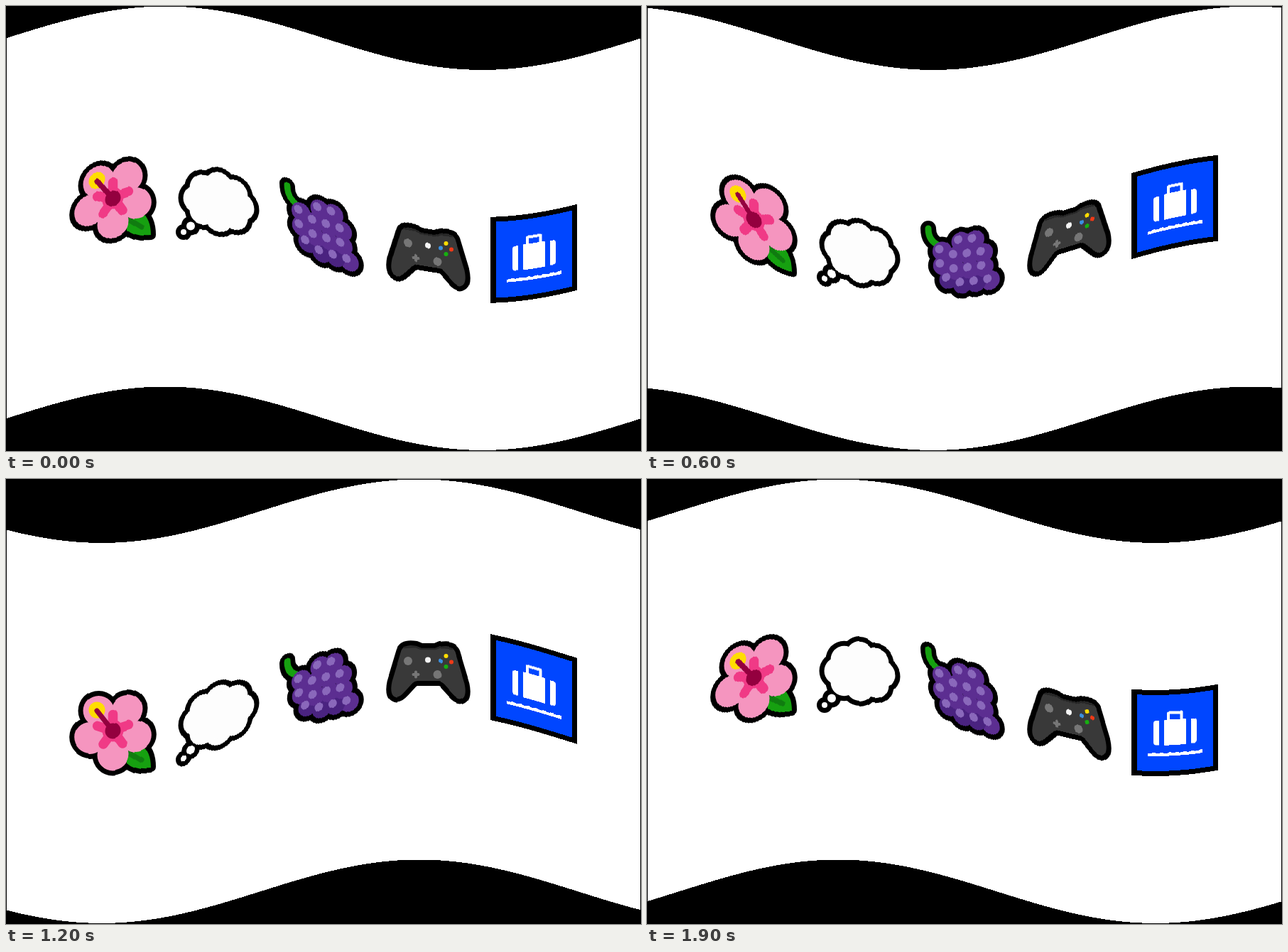
An HTML page with a canvas that plays this animation: 894x626 px, repeating every 2 s.

```html
<!DOCTYPE html>
<html lang="en">
<head>
<meta charset="utf-8">
<title>Waving flag</title>
<style>
html, body { margin: 0; width: 100%; height: 100%; overflow: hidden; background: #000; }
canvas { display: block; }
</style>
</head>
<body>
<canvas id="stage" width="894" height="626"></canvas>
<script>
const W = 894, H = 626, FLAG_H = 535, LOOP = 2000, STEP = 100;
const SWING = W / 20;
const EDGE = 7; // outline thickness around each icon
const TAU = Math.PI * 2;

const stage = document.getElementById('stage').getContext('2d');
const flag = document.createElement('canvas');
flag.width = W;
flag.height = FLAG_H;
const g = flag.getContext('2d');
g.lineCap = g.lineJoin = 'round';

function dot(x, y, r, color) {
  g.fillStyle = color;
  g.beginPath();
  g.arc(x, y, r, 0, TAU);
  g.fill();
}

function dots(points, r, color) {
  for (const [x, y] of points) dot(x, y, r, color);
}

// Evenly spaced points on an ellipse, starting at angle `from`.
function ring(n, x, y, rx, ry, from) {
  return Array.from({ length: n }, (_, i) => {
    const a = from + i * TAU / n;
    return [x + rx * Math.cos(a), y + ry * Math.sin(a)];
  });
}

function box(x, y, w, h, color, radius = 0) {
  g.fillStyle = color;
  g.beginPath();
  g.roundRect(x, y, w, h, radius);
  g.fill();
}

function line(path, width, color) {
  g.lineWidth = width;
  g.strokeStyle = color;
  g.stroke(new Path2D(path));
}

function shape(path, color) {
  g.fillStyle = color;
  g.fill(new Path2D(path));
}

// Runs `paint` twice around (x, y): as is, and flipped left to right.
function mirrored(x, y, paint) {
  for (const side of [1, -1]) {
    g.save();
    g.translate(x, y);
    g.scale(side, 1);
    paint();
    g.restore();
  }
}

function flower() {
  const x = 150.5, y = 264.5, pink = '#f595bf', rose = '#f03a86', wine = '#94003f';
  const petals = ring(5, x, y, 34, 34, TAU / 4);
  const leaf = 'M170 303 L190 288 Q204 298 204 321 Q182 323 170 312 Z';
  dots(petals, 22 + EDGE, '#000');
  line(leaf, EDGE * 2, '#000');
  shape(leaf, '#16a010');
  line('M173 298 L191 309', 7, '#107c10');
  dots(petals, 22, pink);
  dot(x, y, 24, pink);
  for (const tip of ring(5, x, y, 23, 23, -TAU / 4)) line(`M${x} ${y} L${tip}`, 13.5, rose);
  dot(x, y, 15, rose);
  dot(128, 235, 11.5, '#ffdd00');
  line(`M${x} ${y} L128 236`, 7, wine);
  dot(x, y, 11, wine);
}

function bubble() {
  const x = 299.5, y = 269, white = '#fdfdfd';
  const puffs = ring(8, x, y, 31, 23, 0);
  dots(puffs, 19 + EDGE, '#000');
  for (const [grow, color] of [[EDGE, '#000'], [0, '#fff']]) {
    dot(260, 307.5, 6 + grow, color);
    dot(250, 317, 4 + grow, color);
  }
  dots(puffs, 19, white);
  dot(x, y, 32, white);
}

function grapes() {
  const stem = 'M396 223 Q396 241 412 247';
  const fruit = [];
  for (let row = 0; row < 4; row++) {
    const lean = 4 * (row - 1.4) ** 2;
    const [first, last] = row ? [0, 3] : [1, 2];
    for (let i = first; i <= last; i++) {
      const color = row === 3 && i < 3 ? '#4a2380' : '#5c2e91';
      fruit.push({ x: 410.8 + 19.4 * i + lean, y: 240 + 20 * row - (i ? 0 : 8), color });
    }
  }
  line(stem, 22, '#000');
  for (const { x, y } of fruit) dot(x + 4, y + 3, 13.5 + EDGE, '#000');
  line(stem, 9, '#16a010');
  // Bottom row first, so the upper fruit overlaps it.
  for (const { x, y, color } of [...fruit].reverse()) dot(x + 4, y + 3, 13.5, color);
  for (const { x, y } of fruit) dot(x, y, 6, '#8a68bb');
}

function gamepad() {
  const x = 594.5, y = 234, grey = '#767676';
  const half = 'M-1 3 H10 L17 0 Q34 -3 38 6 L51 49 Q55 68 46 71 Q41 73 34 65 L22 52 Q19 49 15 49 H-1 Z';
  mirrored(x, y, () => line(half, EDGE * 2, '#000'));
  mirrored(x, y, () => shape(half, '#393939'));
  mirrored(x, y, () => line('M0 4 H10 L18 1 L34 2', 2.5, '#262626'));
  dot(566, 255, 6, grey);
  dot(607.5, 274, 6, grey);
  line('M573.5 274 H580.5 M577 270.5 V277.5', 4, grey);
  dot(594, 253.5, 4, '#f4f4f4');
  const colors = ['#f03a17', '#16b010', '#3a8fe0', '#ffdd00'];
  ring(4, 619.5, 254.5, 7.5, 7.5, 0).forEach(([bx, by], i) => dot(bx, by, 3, colors[i]));
}

function luggageSign() {
  const x = 743.5, y = 207, white = '#fff';
  box(682, y, 122, 121, '#000');
  box(690, y + EDGE, 107, 107, '#0046ff');
  box(728, 249, 31, 36, white, 1);
  mirrored(x, y, () => box(22.5, 43, 8, 34.5, white, [0, 4, 4, 0]));
  line('M734 249 V239.5 H752.5 V249', 4, white);
  box(705, 296, 77, 4, white);
  for (let bump = 711; bump < 782; bump += 11) box(bump, 295, 5, 4, white);
}

// Whole-pixel drop of column x at time t.
function wave(x, t) {
  return Math.ceil(SWING * (1 - Math.sin(TAU * (x / W + t / LOOP))));
}

function draw(t) {
  stage.fillStyle = '#000';
  stage.fillRect(0, 0, W, H);
  for (let x = 1; x < W - 1; x++) {
    stage.drawImage(flag, x, 0, 1, FLAG_H, x, wave(x, t), 1, FLAG_H);
  }
}

box(0, 0, W, FLAG_H, '#fff');
[flower, bubble, grapes, gamepad, luggageSign].forEach(icon => icon());

const start = performance.now();
let shown = -1;
function tick() {
  const elapsed = performance.now() - start;
  const t = Math.floor((elapsed % LOOP) / STEP) * STEP;
  if (t !== shown) draw(shown = t);
  requestAnimationFrame(tick);
}
tick();
</script>
</body>
</html>
```
